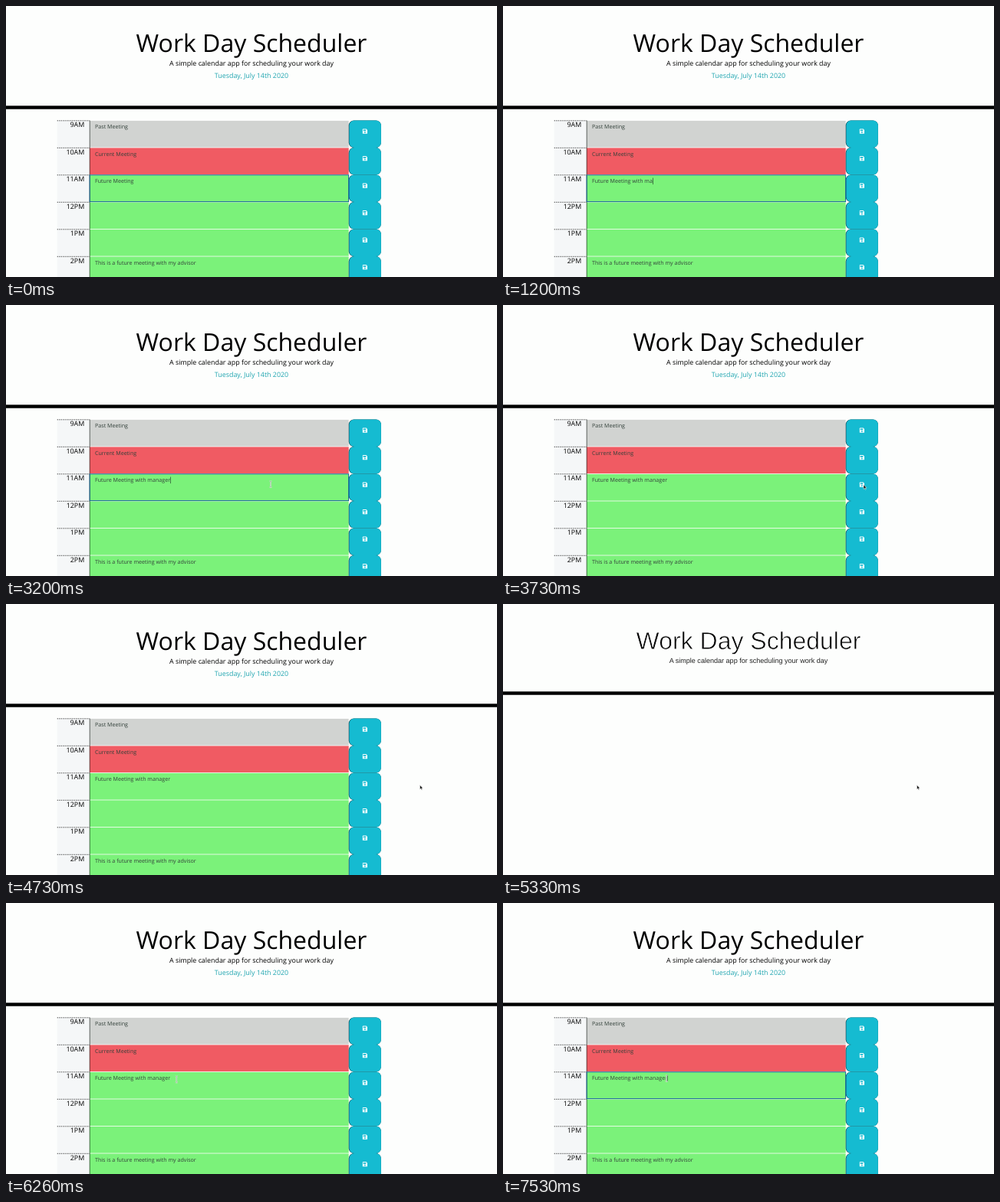
These frames come from a looping animation (640x354 px, 8000 ms). An HTML page:

```html
<!DOCTYPE html>
<html lang="en">
<head>
<meta charset="utf-8">
<title>Work Day Scheduler</title>
<style>
  html, body { margin: 0; width: 100%; height: 100%; overflow: hidden; background: #fdfefd; }
  svg { display: block; width: 640px; height: 354px; }
  text { font-family: "Open Sans", sans-serif; text-rendering: geometricPrecision; white-space: pre; }
  .mid { text-anchor: middle; }
  .end { text-anchor: end; }
  .lead { font-size: 8.89px; }
  .note { font-size: 7.11px; fill: #33403a; }
  #plain text { font-family: "Liberation Sans", Arial, sans-serif; }
</style>
</head>
<body>
<svg id="stage" viewBox="0 0 640 354"></svg>
<script>
const NS = "http://www.w3.org/2000/svg";
const LOOP = 8000, TICK = 1000 / 15;
const TOP = 149.5, ROW = 35.5, LEFT = 66.7, AREA = 108.9, BTN = 446.7, RIGHT = 488.9;
const PAST = "#d1d3d1", NOW = "#f05b63", NEXT = "#7bf27a", TEAL = "#15bbd1";
const rows = [
  ["9AM", PAST, "Past Meeting"],
  ["10AM", NOW, "Current Meeting"],
  ["11AM", NEXT, ""],
  ["12PM", NEXT, ""],
  ["1PM", NEXT, ""],
  ["2PM", NEXT, "This is a future meeting with my advisor"]
];
const START = "Future Meeting ", TYPED = "with manager";
const keys = [130, 260, 460, 660, 800, 1000, 1200, 1400, 1460, 1660, 1860, 2130];
const caretOn = [[130, 2660], [3200, 3660], [6660, 7260], [7530, 8000]];
const focusOn = [[0, 3660], [6660, 8000]];
const blank = [5330, 5400];
// time, x, y of the pointer
const path = [
  [2460, 224.5, 228.5], [2660, 226, 229], [2800, 230, 229.5], [3200, 345, 234],
  [3600, 469, 235], [3730, 470, 234.8], [4400, 470, 234.8], [4600, 515, 236],
  [4730, 539.5, 236.6], [5870, 539.5, 236.6], [6060, 330, 233],
  [6260, 222.5, 230.5], [6600, 213.2, 229]
];

function el(parent, tag, attrs = {}, text) {
  const n = document.createElementNS(NS, tag);
  for (const k in attrs) n.setAttribute(k, attrs[k]);
  if (text !== undefined) n.textContent = text;
  parent.appendChild(n);
  return n;
}
const rect = (p, x, y, w, h, fill, rx = 0) =>
  el(p, "rect", { x, y, width: w, height: h, fill, rx });
const label = (p, x, y, cls, text, more = {}) =>
  el(p, "text", { x, y, class: cls, ...more }, text);

const stage = document.getElementById("stage");
rect(stage, 0, 0, 640, 354, "#fdfefd");
const page = el(stage, "g");
const plain = el(stage, "g", { id: "plain" });

label(page, 320, 60, "mid", "Work Day Scheduler", { "font-size": 32 });
label(page, 320, 77.6, "mid lead", "A simple calendar app for scheduling your work day");
label(page, 320, 93.7, "mid lead", "Tuesday, July 14th 2020", { fill: "#20a5b0" });
rect(page, 0, 130.3, 640, 4.45, "#000");

function saveIcon(p, x, y) {
  const g = el(p, "g", { transform: `translate(${x} ${y})` });
  el(g, "path", {
    d: "M-2.5-3.1H1.7L3.1-1.7V2.5Q3.1 3.1 2.5 3.1H-2.5Q-3.1 3.1-3.1 2.5V-2.5Q-3.1-3.1-2.5-3.1Z",
    fill: "#fff"
  });
  rect(g, -2.2, -2.2, 3.6, 1.7, TEAL, .2);
  el(g, "circle", { cx: 0, cy: 1.3, r: .9, fill: TEAL });
}

const texts = rows.map(([hour, color, note], i) => {
  const y = TOP + i * ROW;
  rect(page, LEFT, y, AREA - LEFT, ROW, "#f5f7f8");
  el(page, "path", {
    d: `M${LEFT} ${y + .3}H${AREA}`, stroke: "#111", "stroke-width": .75, "stroke-dasharray": "1.35 1.1"
  });
  label(page, 102.2, y + 8.9, "end lead", hour);
  rect(page, AREA, y + .4, BTN - AREA, ROW - .8, color);
  rect(page, AREA - .1, y, .65, ROW, "#1c2420");
  rect(page, BTN, y + .1, RIGHT - BTN, ROW - .2, "#123a44", 6.67);
  rect(page, BTN + .65, y + .1, RIGHT - BTN - .65, ROW - .2, TEAL, 6.67);
  saveIcon(page, 467.9, y + 14.2);
  return label(page, 116, y + 10.6, "note", note);
});
const entry = texts[2], entryTop = TOP + 2 * ROW;
const ring = el(page, "rect", {
  x: AREA + .2, y: entryTop + .3, width: BTN - AREA - .3, height: ROW - .7,
  fill: "none", stroke: "#12609a", "stroke-width": .95
});
const caret = rect(page, 0, entryTop + 4, .6, 8.6, "#1a2a20");

// unstyled first paint after the reload
const thin = { "font-size": 32, stroke: "#fdfefd", "stroke-width": .8 };
label(plain, 320, 58.6, "mid", "Work Day Scheduler", thin);
label(plain, 320, 77.3, "mid", "A simple calendar app for scheduling your work day", {
  "font-size": 9.05, fill: "#222"
});
rect(plain, 0, 114.3, 640, 4.45, "#000");

const beam = el(stage, "g");
const beamPath = "M-1.5-4Q0-4 0-3.2V3.2Q0 4-1.5 4M1.5-4Q0-4 0-3.2M0 3.2Q0 4 1.5 4";
el(beam, "path", { d: beamPath, fill: "none", stroke: "#e4f5e2", "stroke-width": 1.7, opacity: .9 });
el(beam, "path", { d: beamPath, fill: "none", stroke: "#6f8f70", "stroke-width": .5 });
const arrow = el(stage, "path", {
  d: "M0 0V5.6L1.3 4.4L2.2 6.5L3.1 6.1L2.2 4.1H4Z",
  fill: "#111", stroke: "#fff", "stroke-width": .5, "stroke-linejoin": "round"
});

const within = (t, spans) => spans.some(([a, b]) => t >= a && t < b);
const show = (n, on) => n.setAttribute("visibility", on ? "visible" : "hidden");

function pointer(t) {
  const i = path.findIndex(p => p[0] > t);
  if (i < 0) return path[path.length - 1].slice(1);
  const [t0, x0, y0] = path[i - 1], [t1, x1, y1] = path[i];
  const k = (t - t0) / (t1 - t0);
  return [x0 + (x1 - x0) * k, y0 + (y1 - y0) * k];
}

function draw(now) {
  const t = now % LOOP;
  const white = within(t, [blank]);
  page.style.display = white ? "none" : "";
  plain.style.display = white ? "" : "none";

  const value = START + TYPED.slice(0, keys.filter(k => k <= t).length);
  if (entry.textContent !== value) entry.textContent = value;
  show(ring, within(t, focusOn));
  show(caret, within(t, caretOn));
  if (!white) caret.setAttribute("x", 116.1 + entry.getComputedTextLength());

  const moving = t >= path[0][0];
  const [x, y] = moving ? pointer(Math.max(path[0][0], Math.floor((t + 7) / TICK) * TICK)) : [0, 0];
  const overText = x > AREA && x < BTN;
  show(beam, moving && overText);
  show(arrow, moving && !overText);
  (overText ? beam : arrow).setAttribute("transform", `translate(${x} ${y})`);
}

const begin = performance.now();
function loop() {
  draw(performance.now() - begin);
  requestAnimationFrame(loop);
}
loop();
</script>
</body>
</html>
```
